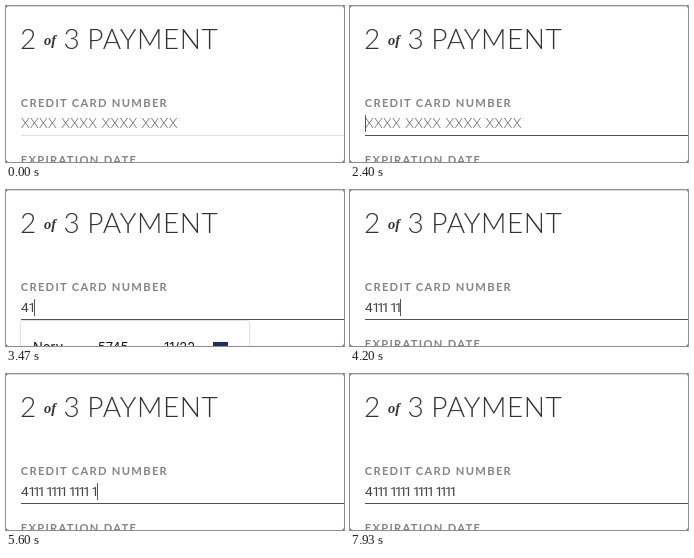
An HTML page that plays this animation: 338 px wide and 156 px high, repeating every 7990 ms.

```html
<!DOCTYPE html>
<html lang="en">
<head>
<meta charset="utf-8">
<title>Payment form</title>
<style>
  html, body { margin: 0; width: 100%; height: 100%; overflow: hidden; background: #666; }
  svg { display: block; width: 100vw; height: 100vh; }
  text { white-space: pre; }
  .title { font: 300 28px Lato, sans-serif; letter-spacing: .55px; fill: #333; }
  .of { font: italic bold 14.5px "Liberation Serif", serif; fill: #333; }
  .label { font: 700 11.2px Lato, sans-serif; letter-spacing: 1.3px; fill: #848484; }
  .hint { font: 300 14px Lato, sans-serif; letter-spacing: .3px; fill: #5c5c5c; }
  .digits { font: 400 13.6px Roboto, sans-serif; fill: #444; }
  .row { font: 400 13px Inter, sans-serif; fill: #111; }
  .sheet { fill: #fff; filter: drop-shadow(0 0 1px rgba(0, 0, 0, .35)); }
</style>
</head>
<body>
<svg viewBox="0 0 338 156">
  <rect width="338" height="156" rx="3" fill="#fff"/>
  <rect x="3" width="332" height="1" fill="#ddd"/>
  <text class="title" x="14" y="43">2</text>
  <text class="of" x="38" y="39">of</text>
  <text class="title" x="57.5" y="43">3</text>
  <text class="title" x="81.3" y="43">PAYMENT</text>
  <text class="label" x="14.7" y="101">CREDIT CARD NUMBER</text>
  <text class="label" x="14.7" y="158">EXPIRATION DATE</text>
  <text class="hint" id="hint" x="15" y="122">XXXX XXXX XXXX XXXX</text>
  <text class="digits" id="digits" y="122"></text>
  <g id="popup">
    <rect class="sheet" x="15" y="131" width="228" height="40" rx="2"/>
    <g class="row">
      <text x="27" y="161.5">Norv</text>
      <text x="92" y="161.5">5745</text>
      <text x="158" y="161.5">11/22</text>
    </g>
    <rect x="207" y="152" width="15" height="15" fill="#1f2c6b"/>
  </g>
  <rect id="rule" x="15" y="129" width="323" height="1"/>
  <rect id="caret" y="109" width="1" height="17" fill="#555"/>
</svg>
<script>
  const LOOP = 7990;
  const CARD = "4111 1111 1111 1111";
  const START = 15.27;
  const ADVANCE = { "4": 8, "1": 4.75, " ": 3.6 };

  // Moments at which each digit is typed; a space follows every full group.
  const KEYS = [2470, 3470, 3670, 3800, 4000, 4200, 4400, 4600,
                4800, 5000, 5200, 5400, 5600, 5800, 6000, 6270];
  const CARET_ON = [[1400, 1870], [2400, 3000], [3470, 6730], [7270, 7730]];
  const POPUP_ON = [[2530, 3670]];

  const el = id => document.getElementById(id);
  const hint = el("hint"), digits = el("digits"), popup = el("popup");
  const rule = el("rule"), caret = el("caret");

  const within = (t, spans) => spans.some(([from, to]) => t >= from && t < to);
  const show = (node, on) => node.setAttribute("visibility", on ? "visible" : "hidden");

  function typedText(t) {
    const count = KEYS.filter(key => t >= key).length;
    return CARD.slice(0, count + Math.min(3, Math.floor(count / 4)));
  }

  function ruleColor(t) {
    const step = [1400, 1470, 1530].filter(at => t >= at).length;
    const level = Math.round(222 - step / 3 * 140);
    return `rgb(${level},${level},${level})`;
  }

  function render(t) {
    const text = typedText(t);
    let pen = START;
    const places = [...text].map(char => {
      const x = char === "1" ? pen - 1 : pen - .3;
      pen += ADVANCE[char];
      return x.toFixed(2);
    });
    digits.textContent = text;
    digits.setAttribute("x", places.join(" "));
    caret.setAttribute("x", Math.floor(pen));
    rule.setAttribute("fill", ruleColor(t));
    show(hint, !text);
    show(caret, within(t, CARET_ON));
    show(popup, within(t, POPUP_ON));
  }

  const begin = performance.now();
  function tick() {
    render((performance.now() - begin) % LOOP);
    requestAnimationFrame(tick);
  }
  tick();
</script>
</body>
</html>
```
